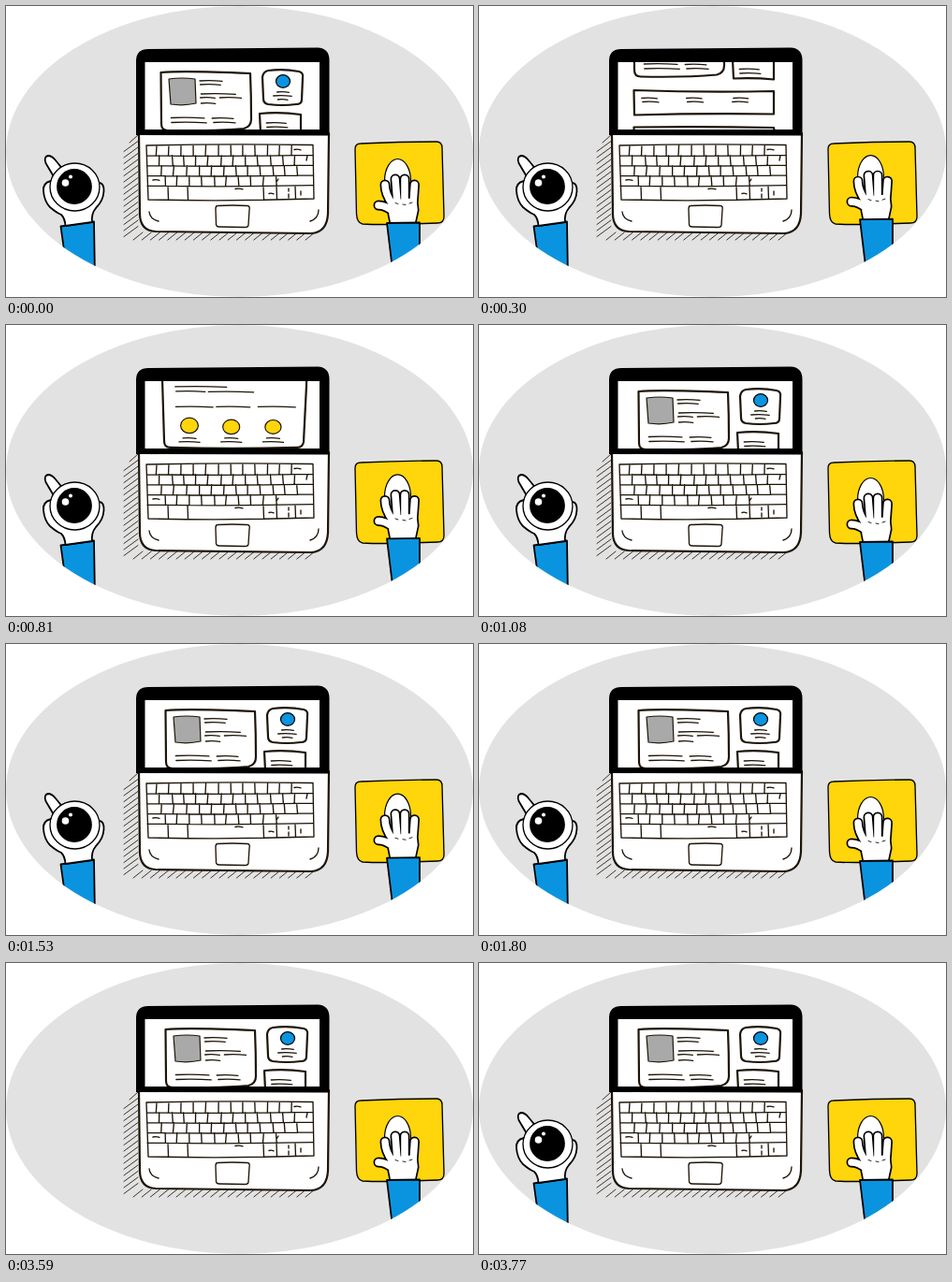
These frames come from a looping animation (499x311 px, 4.77 s). An HTML page:

```html
<!DOCTYPE html>
<html lang="en">
<head>
<meta charset="utf-8">
<title>Desk with laptop</title>
<style>
  html, body { margin: 0; height: 100%; overflow: hidden; background: #fff; }
  svg { display: block; width: 100vw; height: 100vh; }
  path, circle, ellipse { stroke: #000; stroke-width: 1.8; stroke-linecap: round; stroke-linejoin: round; fill: #fff; }
  .pen { stroke: #1d1408; }
  .plain { stroke: none; }
  .thin { stroke-width: 1.35; fill: none; }
  .hair { stroke-width: .85; fill: none; }
  .light { stroke-width: 1.2; }
  .thick { stroke-width: 2.2; }
  .blue { fill: #0a94e0; }
  .yellow { fill: #ffd50b; }
  .black { fill: #000; }
  .gray { fill: #a9a9a9; }
  .desk { fill: #e2e2e2; }
  .skin { stroke: #fff; stroke-width: 7.6; }
  .outline { stroke-width: 11; }
</style>
</head>
<body>
<svg viewBox="0 0 499 311">
  <defs>
    <clipPath id="oval"><ellipse cx="249.5" cy="155.5" rx="249.5" ry="155.5"/></clipPath>
    <clipPath id="screen"><path d="M148.500 60H335V132H148.500Z"/></clipPath>
    <path id="fingers" style="fill:inherit;stroke:inherit;stroke-width:inherit"
      d="M398 213Q405 213 413 219M405 191Q405 201 413 212M416 185L418 210M426 185V210M436.500 191L435 212M413 211L435 209L436 218L433 232H415L413 222Z"/>
  </defs>
  <g clip-path="url(#oval)">
    <path class="plain desk" d="M0 0H499V311H0Z"/>
    <path id="hatch" class="hair pen"/>

    <!-- laptop -->
    <path class="pen thick" d="M142 136L143 222Q143 240 160 241L326 243Q343 242 344 222L345 136Z"/>
    <path class="plain black" d="M139 138V58Q139.500 46 152 46L333 44.500Q345.500 45 345.500 58V138.500Z"/>
    <path class="plain" d="M148.500 60H335V132H148.500Z"/>
    <g clip-path="url(#screen)">
      <g id="page">
        <g id="top">
          <path class="pen thick" d="M165.500 71Q190 69 261 72Q262 95 262 121Q262 129 254 131Q220 134 173 133Q166 133 166 126Z"/>
          <path class="pen gray light" d="M174 78Q188 76 202 78L203 104Q190 107 176 105Z"/>
          <path class="pen thick" d="M280 69Q297 67 313 70Q318 71 317 77L316 100Q316 105 310 105Q295 107 280 105Q275 104 275 99L274 76Q275 70 280 69Z"/>
          <ellipse class="blue light" cx="296" cy="80.500" rx="7.500" ry="6.800"/>
          <path class="pen thick" d="M271 115Q293 113 315 116L315 136Q294 134 272 135Z"/>
          <path id="topText" class="thin pen"/>
        </g>
        <path class="pen thick" d="M165.500 147.500Q240 150 315 148.500L315 173Q240 172 166 174Z"/>
        <path class="pen thick" d="M165.500 187Q240 186 315 187.500Q322 225 321 262L318 322Q317 328 311 328Q240 330 176 328Q169 328 169 321L167 255Z"/>
        <g id="dots"></g>
        <path id="pageText" class="thin pen"/>
        <use href="#top" x="5" y="271"/>
      </g>
    </g>
    <path id="keys" class="thin pen"/>
    <path class="thin pen" d="M226 213.500Q242 212.500 258 213.500Q261 214 260 218L259 234Q259 236.500 255 236.500L228 236Q224 236 224.500 232L224 217Q224 213.500 226 213.500Z
      M153 220Q154 228 163 230M334 218Q334 227 325 230"/>

    <!-- coffee -->
    <g id="coffee">
      <path class="blue" d="M58.500 235.500L94 230.500L95 290H66Z"/>
      <path d="M48 187Q39 189 40 198Q41 209 47 215Q54 221 59 223Q63 227 63.500 235L92 231Q91 222 96 216Q104 208 104.500 198Q105 190 100 189Z"/>
      <path d="M52 184L42.500 168Q40 161 45 160Q49 160 53 165L62 176Z"/>
      <ellipse class="thin" style="fill:#fff" cx="73.500" cy="193.500" rx="26.500" ry="25.500"/>
      <circle class="black" cx="73" cy="193" r="18"/>
      <circle class="plain" cx="63.500" cy="189" r="3.800"/>
      <circle class="plain" cx="69" cy="182.500" r="2"/>
    </g>

    <!-- mouse hand -->
    <path class="yellow thin" style="fill:#ffd50b" d="M379 147Q420 145 460 145Q466 145 466 152L468 225Q468 232 461 232L430 233Q400 234 381 233Q375 232 374.500 222L373 153Q373 147 379 147Z"/>
    <g id="hand">
      <ellipse class="light" cx="418.500" cy="187" rx="14" ry="23.500"/>
      <use href="#fingers" class="outline" stroke="#000" fill="#000"/>
      <use href="#fingers" class="skin" fill="#fff"/>
      <path class="blue" d="M407 232L442 231.500V290H414Z"/>
      <path class="hair" d="M416 210.500l3 1M424 212l3 .5M431 211l3 -1"/>
    </g>
  </g>
</svg>
<script>
const LOOP = 4770;
const el = id => document.getElementById(id);
const draw = (id, d) => el(id).setAttribute('d', d);
const move = (id, y) => el(id).setAttribute('transform', `translate(0 ${y})`);

let seed = 7;
const jitter = size => ((seed = seed * 16807 % 2147483647) / 2147483647 - .5) * size;

const dash = (x, y, w) => `M${x} ${y}q${w / 2} -.8 ${w} .4`;

// A block of handwritten lines with slightly uneven lengths
const text = (x, y, w, rows, gap) => {
  let d = '';
  for (let i = 0; i < rows; i++) d += dash(x + jitter(2), y + i * gap, w * (.94 + jitter(.14)));
  return d;
};

draw('topText',
  text(208, 80, 24, 2, 4) + text(208, 94, 39, 1, 0) + text(208, 98, 16, 2, 6) + text(228, 98, 24, 1, 0) +
  text(289, 92, 14, 1, 0) + text(286, 96, 20, 1, 0) + text(290, 100, 12, 1, 0) +
  text(176, 119.5, 38, 2, 5) + text(221, 120, 24, 2, 4.5) + text(278, 125, 22, 2, 4.5));

let pageText = text(181, 263, 60, 1, 0) + text(181, 268, 34, 1, 0) + text(217, 268.5, 53, 1, 0);
let dots = '';
for (let i = 0; i < 3; i++) {
  const x = 196 + 44.7 * i, y = 304.5 + Math.min(i, 1) * 1.5;
  dots += `<ellipse class="yellow pen light" cx="${x}" cy="${y}" rx="${9.4 - i * .4}" ry="${8.2 - i * .4}"/>`;
  pageText += text(174 + 48.5 * i, 156, 18, 2, 4) + text(181 + 44 * i, 284.5, 40, 1, 0) +
    dash(x - 7, 318, 14) + dash(x - 11, 322, 22);
}
el('dots').innerHTML = dots;
draw('pageText', pageText);

// Keyboard: each row of keys starts a little further right
let keys = 'M150 149Q240 147 328 148.500L329 206Q240 209 152 207Z';
for (let row = 0; row < 4; row++) {
  const y = 149 + 10.8 * row;
  for (let key = 0; key < (row < 3 ? 12 : 10); key++)
    keys += `M${161 + 3 * row + 13.1 * key + jitter(1.5)} ${y}l${jitter(2)} 10.8`;
  keys += `M151 ${y + 10.8}q90 1.500 177 -.5`;
}
for (const x of [173, 194, 275, 289, 309]) keys += `M${x} 192.500l.5 14`;
keys += dash(308, 153.5, 7) + dash(157, 186, 7) + dash(245, 195.5, 8) + dash(281, 200.5, 5);
keys += 'M322 160l-1 5M291 185l-2 3M302 195v3m0 3v4M315 198v4';
draw('keys', keys);

// Hatched shadow
let hatch = '';
for (let y = 138; y < 242; y += 6.5) hatch += `M141 ${y}l${-Math.min(15, y - 129)} ${Math.min(11, y - 130)}`;
for (let x = 146; x < 336; x += 9.2) hatch += `M${x} 242l-10 8`;
draw('hatch', hatch);

const start = performance.now();

function frame(now) {
  const t = Math.max(0, now - start) % LOOP;
  // Stepped progress: the first step lands at a, the last at b
  const steps = (a, b, n) =>
    Math.min(1, Math.max(0, (Math.floor((t - a) / (b - a) * (n - 1) + 1e-6) + 1) / n));

  const scroll = steps(30, 1080, 36);
  const nudge = steps(1410, 1800, 13);
  const sip = steps(2200, 2380, 7) - steps(3590, 3770, 7);

  move('page', -271 * Math.max(0, (scroll * 12 - 1) / 11));
  move('hand', -5 * Math.sin(Math.PI * scroll) - 4 * Math.sin(Math.PI * nudge));
  move('coffee', 130 * sip);
  requestAnimationFrame(frame);
}
requestAnimationFrame(frame);
</script>
</body>
</html>
```
